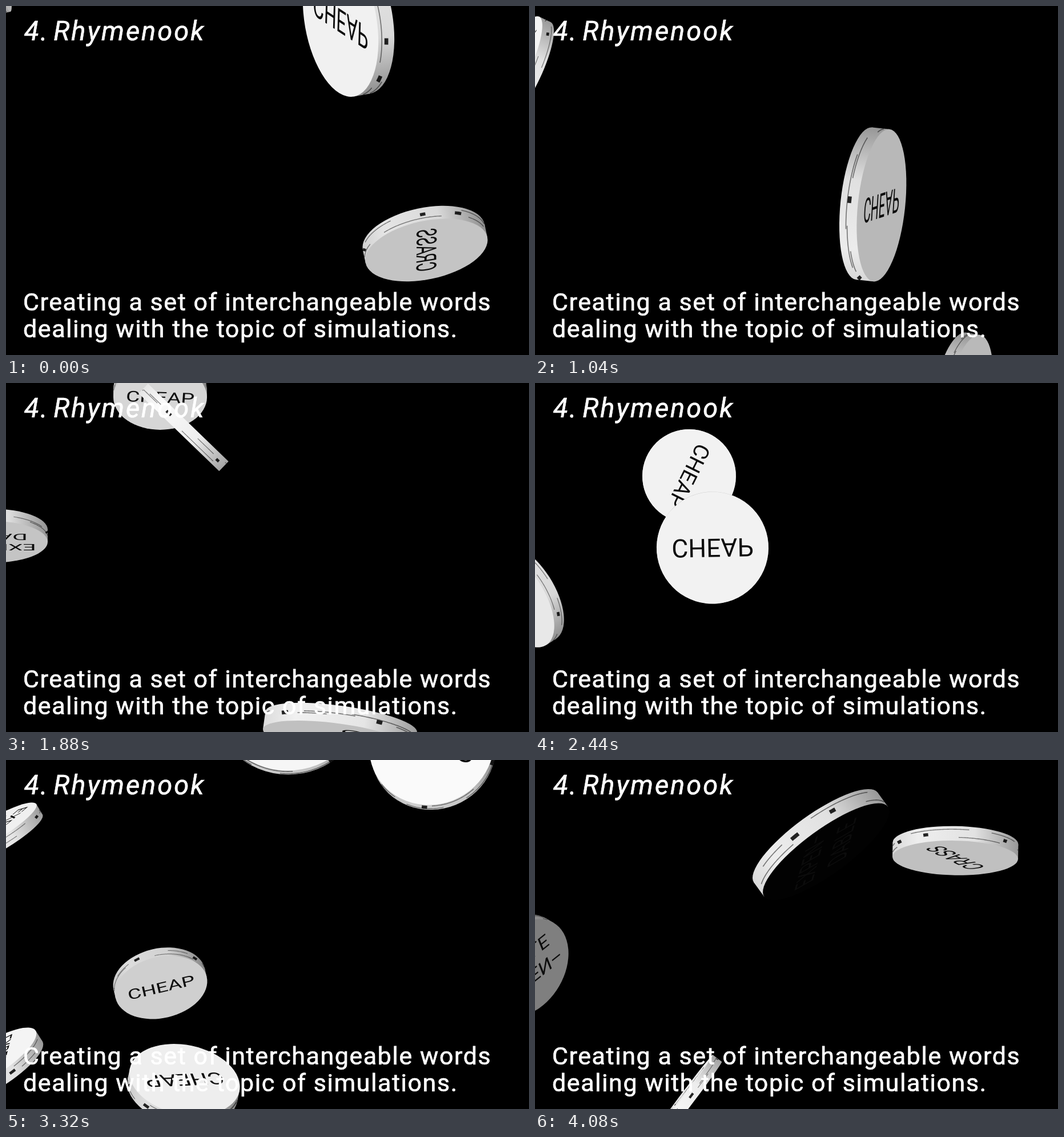
These frames come from a looping animation (916x611 px, 4.12 s). An HTML page with a canvas:

```html
<!DOCTYPE html>
<html lang="en">
<head>
<meta charset="utf-8">
<title>Falling words</title>
<style>
  html, body { margin: 0; width: 916px; height: 611px; overflow: hidden; background: #000; }
  canvas, svg { position: absolute; left: 0; top: 0; }
  text {
    font-family: Roboto, "Liberation Sans", sans-serif;
    fill: #fff; stroke: #fff; stroke-width: .7px; white-space: pre;
  }
  .title { font-size: 47px; font-style: italic; letter-spacing: 3px; word-spacing: -7px; }
  .note { font-size: 43px; letter-spacing: 1.55px; }
</style>
</head>
<body>
<canvas id="stage" width="916" height="611"></canvas>
<svg width="916" height="611">
  <text class="title" x="32" y="60">4. Rhymenook</text>
  <text class="note" x="30" y="533">Creating a set of interchangeable words</text>
  <text class="note" x="30" y="580">dealing with the topic of simulations.</text>
</svg>
<script>
const ctx = document.getElementById('stage').getContext('2d');
const LOOP = 4120, STEP = 40, RAD = Math.PI / 180;
const FONT = 'Roboto, "Liberation Sans", sans-serif';
const CHEAP = ['CHEAP'], CRASS = ['CRASS'], EXPENDABLE = ['EXPEN–', 'DABLE'];

// Each coin is at (x, y) at time `at`, drifts and falls in px/ms, and tumbles
// through a few poses: time, axis, tilt, turn (degrees).
const coins = [
  { words: EXPENDABLE, r: 97, at: 480, x: -24, y: 7, fall: .186,
    poses: [[480, 12, -80, 60], [1880, -180, -68, 0], [3000, -65, -52, 94], [3600, -4, -91, 120]] },
  { words: EXPENDABLE, r: 91, at: 3000, x: -20, y: 10, fall: .407, drag: 7.7e-5,
    poses: [[3000, 115, 52, 274], [3600, 180, 101, 360], [4080, 120, 135, 511]] },
  { words: CHEAP, r: 82, at: 3000, x: 270, y: 308, fall: .259,
    poses: [[1880, 0, 46, 3], [3000, 58, -45, 172], [3600, 262, -53, 187], [4080, 307, -88, 200]] },
  { words: CHEAP, r: 98, at: 3000, x: 311, y: 474, fall: .309, drag: 4e-5,
    poses: [[1880, 44, 90, 0], [3000, 14, 272, 60], [3600, 10, 340, 243]] },
  { words: CRASS, r: 109, at: 0, x: 734, y: 416, fall: .255, drift: .014,
    poses: [[0, -12, -118, 84], [480, 18, -57, -4], [1040, 100, -70, -60]] },
  { words: CRASS, r: 110, at: 3600, x: 743, y: 45, fall: .237, drift: -.014,
    poses: [[3600, 100, 40, -136], [4080, 1, 74, -121]] },
  { words: CHEAP, r: 134, at: 0, x: 600, y: 24, fall: .311, drift: -.008,
    poses: [[0, -100, 118, -114], [480, -27, 140, -224], [1040, 96, 108, -262], [1880, 188, 102, -290]] },
  { words: EXPENDABLE, r: 134, at: 3600, x: 497, y: -14, fall: .338, drift: .008,
    poses: [[3600, 230, 35, 257], [4080, 324, 73, 290]] }
];

function seeded(seed) {
  return () => (seed = (seed * 16807) % 2147483647) / 2147483647;
}

// Marks pressed into the rim, shared by all coins: short ones are thick and dark.
const rand = seeded(411);
const marks = Array.from({ length: 14 }, (_, i) => {
  const long = i % 3 > 0;
  return {
    start: i * 26 + rand() * 14,
    sweep: long ? 22 + rand() * 40 : 5 + rand() * 4,
    weight: long ? .012 : .05,
    level: long ? (rand() - .5) * .14 : 0,
    ink: long ? .5 : .85
  };
});

function gray(v) {
  const n = Math.round(Math.max(0, Math.min(250, v)));
  return `rgb(${n},${n},${n})`;
}

// Linear between poses, carried on at the same rate beyond both ends.
function tumble(poses, t) {
  let i = 1;
  while (i < poses.length - 1 && poses[i][0] < t) i++;
  const p = poses[i - 1], q = poses[i], k = (t - p[0]) / (q[0] - p[0]);
  return [1, 2, 3].map(j => (p[j] + (q[j] - p[j]) * k) * RAD);
}

// Light comes from the upper left; faces turned to the lower right go dark.
function faceLight(nx, ny, nz) {
  const lit = -.4 * nx - .3 * ny + .6 * nz;
  return 200 + 70 * lit - 480 * Math.max(0, Math.min(nx, ny) - .19);
}

function fillEllipse(y, rx, ry) {
  ctx.beginPath();
  ctx.ellipse(0, y, rx, ry, 0, 0, 2 * Math.PI);
  ctx.fill();
}

function drawRim(r, ry, off, axis, nz) {
  const dir = Math.cos(axis) < 0 ? -1 : 1, top = 250 - 45 * nz;
  const shade = ctx.createLinearGradient(-r * dir, 0, r * dir, 0);
  shade.addColorStop(0, gray(top - 20));
  shade.addColorStop(.2, gray(top));
  shade.addColorStop(.65, gray(top - 12));
  shade.addColorStop(1, gray(top - 85));
  ctx.fillStyle = shade;
  fillEllipse(-off, r, ry);
  ctx.fillRect(-r, -Math.abs(off), 2 * r, 2 * Math.abs(off));
}

function drawMarks(r, tilt, turn) {
  const k = Math.cos(tilt), side = Math.sin(tilt);
  for (const m of marks) {
    let open = false;
    ctx.beginPath();
    for (let d = 0; d <= m.sweep; d++) {
      const f = (m.start + d) * RAD + turn;
      const seen = Math.sin(f) * side < -.08;
      const x = r * Math.cos(f), y = r * (k * Math.sin(f) + side * m.level);
      if (seen && open) ctx.lineTo(x, y);
      else if (seen) ctx.moveTo(x, y);
      open = seen;
    }
    ctx.lineWidth = Math.max(.8, m.weight * r);
    ctx.strokeStyle = `rgba(0,0,0,${m.ink})`;
    ctx.stroke();
  }
}

function drawWords(r, words) {
  const two = words.length > 1, size = r * (two ? .42 : .455);
  ctx.font = `${size}px ${FONT}`;
  ctx.textAlign = 'center';
  ctx.fillStyle = '#0c0c0c';
  words.forEach((word, i) => {
    const mid = two ? (i - .5) * size * 1.2 : 0;
    ctx.fillText(word, 0, mid + size * .355);
  });
}

function drawCoin(coin, t) {
  const { words, r, at, x, y, fall, drift = 0, drag = 0, poses } = coin;
  const dt = t - at, cy = y + fall * dt - drag * dt * dt;
  if (cy < -1.2 * r || cy > 611 + 1.2 * r) return;

  const [axis, tilt, turn] = tumble(poses, t);
  const k = Math.cos(tilt), nz = Math.abs(k);
  const lean = Math.sign(k) * Math.sin(tilt);
  const off = lean * r * .12;

  ctx.save();
  ctx.translate(x + drift * dt, cy);
  ctx.rotate(axis);
  drawRim(r, r * nz, off, axis, nz);
  drawMarks(r, tilt, turn);
  ctx.translate(0, off);
  ctx.fillStyle = gray(faceLight(-lean * Math.sin(axis), lean * Math.cos(axis), nz));
  fillEllipse(0, r, r * nz);
  ctx.scale(1, k);
  ctx.rotate(turn);
  drawWords(r, words);
  ctx.restore();
}

const begin = performance.now();

function frame() {
  const t = Math.floor(((performance.now() - begin) % LOOP) / STEP) * STEP;
  ctx.fillStyle = '#000';
  ctx.fillRect(0, 0, 916, 611);
  for (const coin of coins) drawCoin(coin, t);
  requestAnimationFrame(frame);
}
frame();
</script>
</body>
</html>
```
